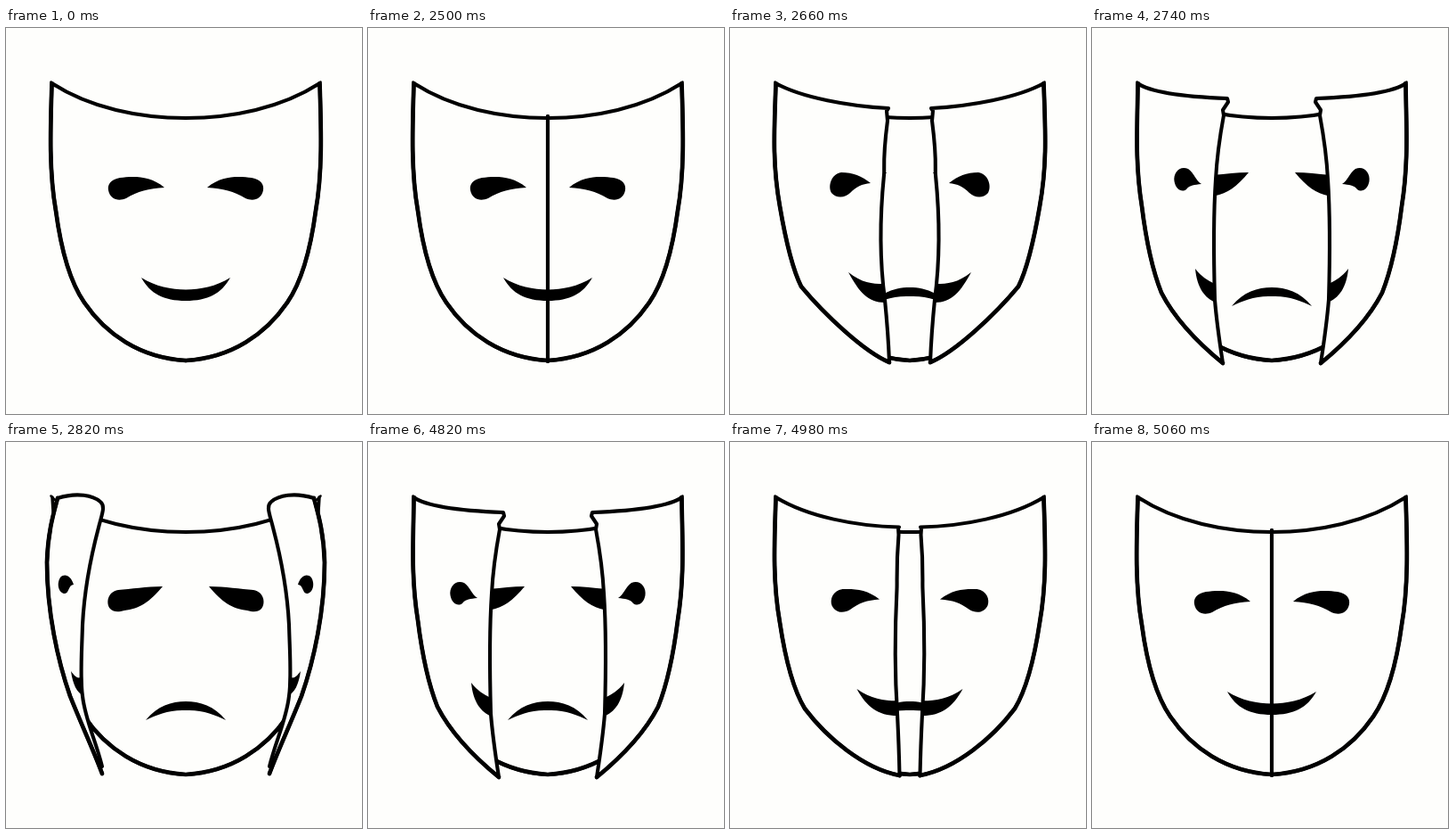
An HTML page with a canvas for the animation above (5.14 s loop, 400 by 433 pixels).

```html
<!DOCTYPE html>
<html lang="en">
<head>
<meta charset="utf-8">
<title>Two-faced mask</title>
<style>
  html, body { margin: 0; width: 100%; height: 100%; overflow: hidden; background: #fefefc; }
  canvas { display: block; width: 400px; height: 433px; }
</style>
</head>
<body>
<canvas id="stage"></canvas>
<script>
const W = 400, H = 433, AXIS = 202, LOOP = 5140;
const INK = '#000', PAPER = '#fefefc';

// Every shape is the left half; the right half is its mirror image.
// side, top and seam join into one closed outline.
const shut = {
  side: 'M202 373 C150 370 112 343 88 308 C72 285 62 250 56 205 C48 160 50 110 51.5 62',
  top: ' C95 90 150 101 202 101',
  seam: ' L202 99 L202 104 C202 130 202 150 202 165 C202 225 202 275 202 305 C202 335 202 350 202 374',
  eye: 'M178 179 C160 164 140 167 128 168 C117 170 114 176 115 182 C117 192 126 195 135 191 C148 183 160 180 178 179Z',
  mouth: 'M152 280 C168 290 186 293.5 202 293.5 L202 306 C177 306 162 298 152 280Z'
};
const ajar = {
  side: 'M179 375 C150 363 105 320 80 290 C70 270 62 235 56 200 C47 150 50 110 51.5 62',
  top: ' C80 78 135 88 178 90',
  seam: ' L176 93 L177 104 C171 150 174 160 173 165 C167 225 170 275 174 305 C177 335 178 350 179 375',
  eye: 'M158 174 C148 166 138 162 125 162 C113 164 110 178 114 185 C120 192 130 190 135 185 C142 178 148 175 158 174Z',
  mouth: 'M133 274 C148 286 160 287 172 287 L174 308 C155 308 145 296 133 274Z'
};
const half = {
  side: 'M147 376 C125 358 95 330 78 297 C68 272 61 240 56 200 C48 150 51 110 51.5 62',
  top: ' C65 72 100 77 152 79',
  seam: ' L153 83 L147 92 L148 98 C143 125 140 150 139 170 C136 215 137 270 138 305 C140 330 143 350 147 376',
  eye: 'M123 175 C117 172 115 163 108 158 C98 154 91 163 92.5 172 C94 181 101 185 106 181 C110 176 115 176 123 175Z',
  mouth: 'M116 270 C123 279 130 283 138 287 L139 308 C127 303 118 292 116 270Z'
};
const open = {
  side: 'M108 372 C98 345 86 320 72 285 C58 245 46 190 46 135 C47 100 54 78 58 63',
  top: ' C80 56 98 60 106 67',
  seam: ' C112 72 108 80 104 96 C95 130 88 165 86 205 C85 240 83 265 86 285 C89 312 101 335 108 364',
  eye: 'M76 160 C73 150 66 147 61 152 C56 160 60 170 66 170 C71 170 70 160 76 160Z',
  mouth: 'M73 257 C78 264 82 267 86 262 L87 284 C80 282 75 272 73 257Z'
};
const sad = {
  eye: 'M176 162 C158 162 140 165 126 166 C114 168 112 181 117 187 C121 191 126 191 133 189 C150 187 161 180 176 162Z',
  mouth: 'M157 312 C170 296 186 291 202 291 L202 301 C184 300 169 306 157 312Z'
};

function blend(a, b, t) {
  const mix = {};
  for (const key in a) {
    const to = b[key].match(/[\d.]+/g);
    let i = 0;
    mix[key] = a[key].replace(/[\d.]+/g, n => +n + (to[i++] - n) * t);
  }
  return mix;
}

// clip: where the face behind starts to show
const poses = [
  { flap: shut, clip: AXIS },
  { flap: shut, clip: AXIS, split: true },
  { flap: blend(shut, ajar, 0.5), clip: 188, split: true },
  { flap: ajar, clip: 174, split: true },
  { flap: half, clip: 138, split: true },
  { flap: open, clip: 86, split: true, folded: true }
];
const steps = [[0, 0], [2500, 1], [2580, 2], [2660, 3], [2740, 4],
  [2820, 5], [4820, 4], [4900, 3], [4980, 2], [5060, 1]];

const canvas = document.getElementById('stage');
const ctx = canvas.getContext('2d');
const dpr = window.devicePixelRatio || 1;
canvas.width = W * dpr;
canvas.height = H * dpr;

function fill(d, color = INK) {
  ctx.fillStyle = color;
  ctx.fill(new Path2D(d));
}

function stroke(d, width) {
  ctx.lineWidth = width;
  ctx.stroke(new Path2D(d));
}

function outline({ side, top, seam }, split) {
  stroke(side, 4.7);
  stroke(side + top + (split ? seam : ''), 4.1);
}

function drawBack(clip) {
  ctx.save();
  ctx.beginPath();
  ctx.rect(clip, 0, AXIS - clip, H);
  ctx.clip();
  outline(shut);
  fill(sad.eye);
  fill(sad.mouth);
  ctx.restore();
}

function drawHalf({ flap, clip, split, folded }) {
  if (clip < AXIS) drawBack(clip);
  fill(flap.side + flap.top + flap.seam + 'Z', PAPER);
  fill(flap.eye);
  fill(flap.mouth);
  outline(flap, split);
  stroke('M50.5 60.5 L55 65', 2.5);
  if (folded) stroke('M52 62 L53 78', 3.5);
}

function draw(pose) {
  ctx.setTransform(dpr, 0, 0, dpr, 0, 0);
  ctx.fillStyle = PAPER;
  ctx.fillRect(0, 0, W, H);
  ctx.lineJoin = ctx.lineCap = 'round';
  ctx.strokeStyle = INK;
  drawHalf(pose);
  ctx.save();
  ctx.translate(2 * AXIS, 0);
  ctx.scale(-1, 1);
  drawHalf(pose);
  ctx.restore();
}

const start = performance.now();
function tick() {
  const t = (performance.now() - start) % LOOP;
  draw(poses[steps.filter(([at]) => at <= t).pop()[1]]);
  requestAnimationFrame(tick);
}
tick();
</script>
</body>
</html>
```
